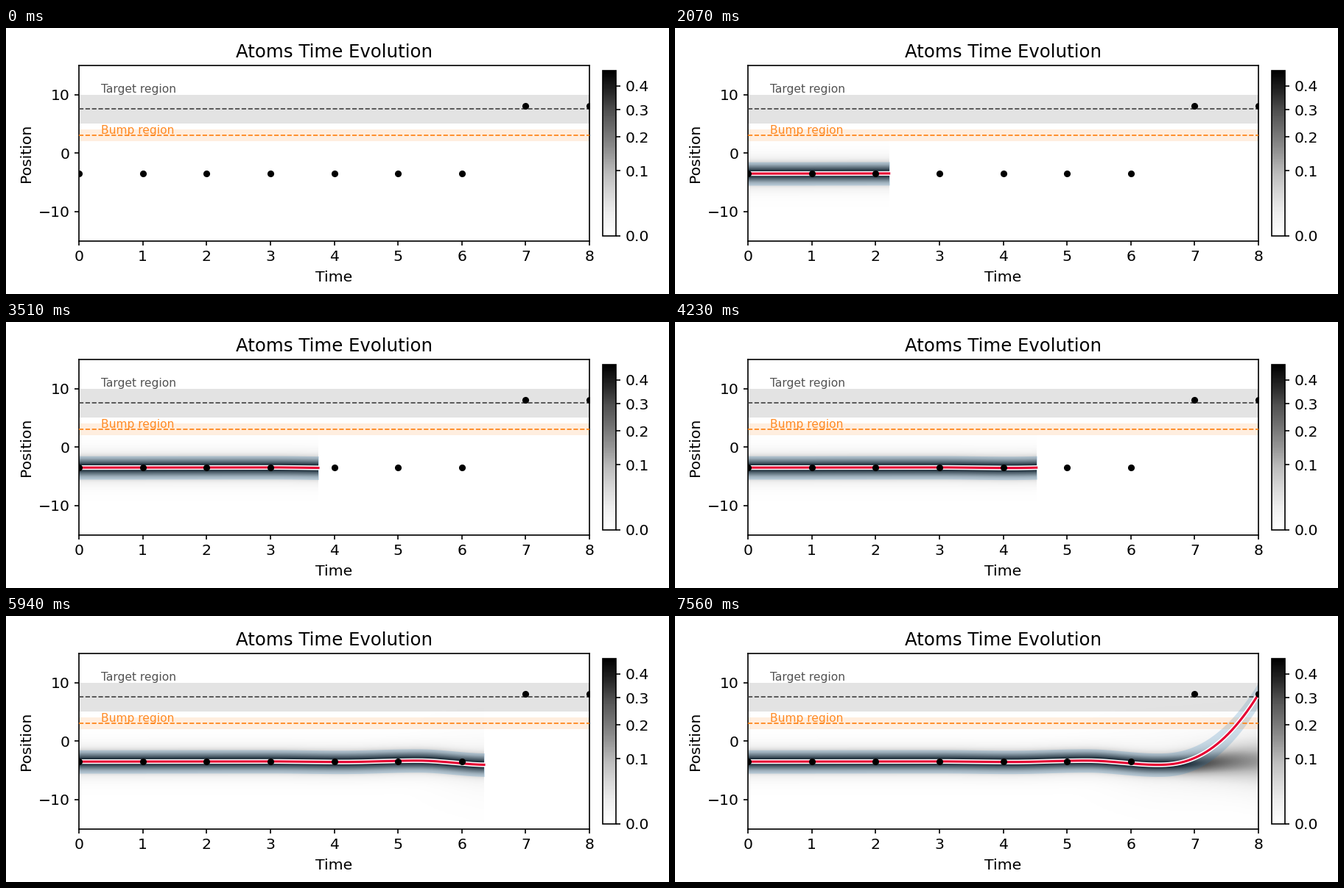
A matplotlib script that plays this animation: 900x362 px, repeating every 7.65 s.

```python
import numpy as np
import matplotlib.pyplot as plt
from matplotlib.animation import FuncAnimation
from matplotlib.cm import ScalarMappable
from matplotlib.colors import PowerNorm
from matplotlib.patches import Rectangle

W, H, DPI = 900, 362, 100
FRAMES, INTERVAL = 85, 90
T_END, T_STEP = 8.0, 0.0962
PEAK, WIDTH = 0.47, 1.064
T_LIFT, Y_LIFT = 6.43, -4.05

plt.rcParams.update({
    "font.family": "DejaVu Sans",
    "font.size": 14.7,
    "axes.linewidth": 1.2,
    "xtick.major.size": 4.5, "ytick.major.size": 4.5,
    "xtick.major.pad": 4.5, "ytick.major.pad": 4.5,
    "xtick.major.width": 1.2, "ytick.major.width": 1.2,
})


def px_axes(left, top, right, bottom):
    return fig.add_axes([left / W, 1 - bottom / H,
                         (right - left) / W, (bottom - top) / H])


def label(x, y, text, size=14.7, **kw):
    fig.text(x / W, 1 - y / H, text, fontsize=size, ha="center",
             va="baseline", rotation_mode="anchor", **kw)


def ease(u):
    return (1 - np.cos(np.pi * np.clip(u, 0, 1))) / 2


def trap_path(t):
    """Small growing ripples, then a steep lift to the target."""
    knots = [(0, -3.5), (3, -3.47), (4.1, -3.57), (5.3, -3.33), (T_LIFT, Y_LIFT)]
    y = np.full_like(t, knots[0][1])
    for (t0, y0), (t1, y1) in zip(knots, knots[1:]):
        y += (y1 - y0) * ease((t - t0) / (t1 - t0))
    lift = np.clip((t - T_LIFT) / (T_END - T_LIFT), 0, 1)
    return y + (8 - Y_LIFT) * lift ** 2.3


def density(t, x):
    """Bound cloud that spreads once the trap leaves it behind."""
    late = np.clip((t - 6.5) / 1.5, 0, 1)
    center = np.where(t < T_LIFT, trap_path(t),
                      Y_LIFT + 0.65 * ease((t - T_LIFT) / (T_END - T_LIFT)))
    width = WIDTH + 1.35 * late ** 1.5
    core = PEAK * (WIDTH / width) ** 1.5 / np.cosh((x - center) / width) ** 2
    halo = 0.007 * ease((t - 5) / 2.2) * np.exp(-((x - center) / 4.5) ** 2)
    return core + halo


fig = plt.figure(figsize=(W / DPI, H / DPI), dpi=DPI, facecolor="white")
ax = px_axes(99, 50.7, 792, 289.8)
ax.set_xlim(0, T_END)
ax.set_ylim(-15, 15)
ax.set_xticks(range(9))
ax.set_yticks([-10, 0, 10])

norm = PowerNorm(0.6, vmin=0, vmax=PEAK)
ts = np.linspace(0, T_END, 694)
xs = np.linspace(-15, 15, 480)
path = trap_path(ts)

heat = ax.imshow(density(ts[None, :], xs[:, None]), origin="lower",
                 extent=(0, T_END, -15, 15), aspect="auto", cmap="Greys",
                 norm=norm, zorder=0)
band = ax.fill_between(ts, path - 2, path + 2, color="#1f77b4",
                       alpha=0.2, lw=0, zorder=1)

for low, high, fill, alpha, ink, name, y in (
        (5, 10, "gray", 0.22, "#404040", "Target region", 10.35),
        (2, 4, "#ff7f0e", 0.13, "#ff7f0e", "Bump region", 3.35)):
    ax.axhspan(low, high, color=fill, alpha=alpha, lw=0, zorder=2)
    ax.axhline((low + high) / 2, color=ink, ls="--", lw=1.2, zorder=3)
    ax.text(0.35, y, name, color=ink, alpha=0.9, fontsize=11.2, zorder=6)

outline, = ax.plot([], [], color="white", lw=4.5, zorder=4)
trace, = ax.plot([], [], color="#e60033", lw=2.25, zorder=5)
ax.scatter(range(9), [-3.5] * 7 + [8] * 2, s=43, color="black", lw=0, zorder=6)

label(445.5, 40.5, "Atoms Time Evolution", 17.55)
label(445.5, 345, "Time")
label(33, 170.5, "Position", rotation=90)

cax = px_axes(810, 58, 828, 283)
bar = fig.colorbar(ScalarMappable(norm, "Greys"), cax=cax,
                   ticks=[0, 0.1, 0.2, 0.3, 0.4])
bar.ax.set_yticklabels(["0.0", "0.1", "0.2", "0.3", "0.4"])
bar.ax.minorticks_off()


def update(i):
    now = min(T_END, T_STEP * i)
    t = np.append(ts[ts < now], now)
    # A rectangular clip is fixed when set, so renew it each time.
    window = Rectangle((0, -15), now, 30, transform=ax.transData)
    for art in (heat, band):
        art.set_visible(now > 0)
        art.set_clip_path(window)
    for line in (outline, trace):
        line.set_data(t, trap_path(t))
    return heat, band, outline, trace


anim = FuncAnimation(fig, update, frames=FRAMES, interval=INTERVAL,
                     repeat=True, repeat_delay=0, blit=False)
plt.show()
```
